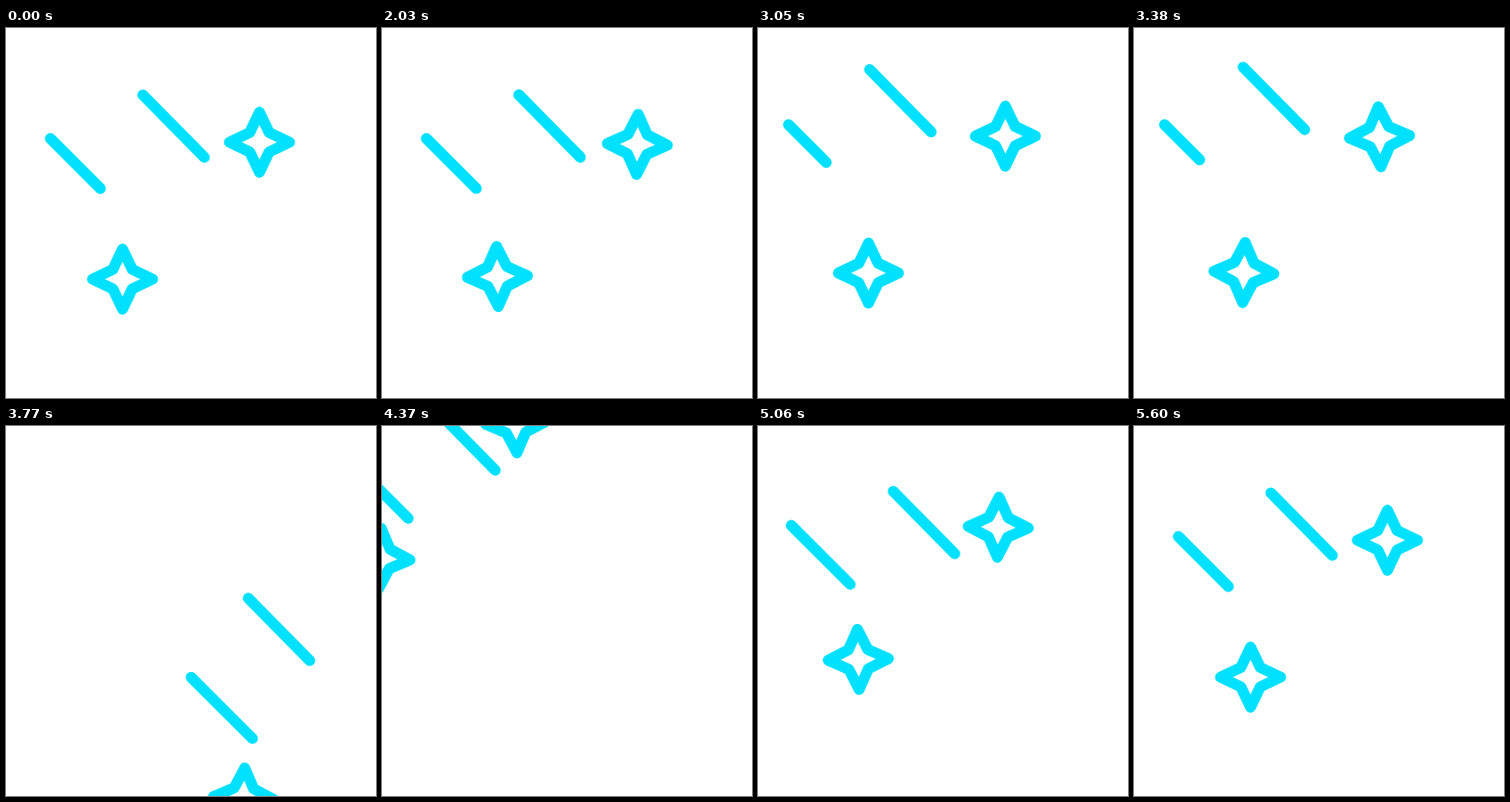
An HTML page for the animation above (5.63 s loop, 400 by 400 pixels).

```html
<!DOCTYPE html>
<html lang="en">
<head>
<meta charset="utf-8">
<title>Shooting stars</title>
<style>
  html, body { margin: 0; width: 100%; height: 100%; overflow: hidden; background: #fff; }
  svg { display: block; width: 100vw; height: 100vh; }
</style>
</head>
<body>
<svg viewBox="0 0 400 400" fill="none" stroke="#00e1ff" stroke-width="11.8" stroke-linecap="round" stroke-linejoin="round">
  <path id="long"/>
  <path id="short"/>
  <path id="upper" d="M0-32.5 10.5-10.5 32.5 0 10.5 10.5 0 32.5-10.5 10.5-32.5 0-10.5-10.5Z"/>
  <path id="lower" d="M0-32.5 10.5-10.5 32.5 0 10.5 10.5 0 32.5-10.5 10.5-32.5 0-10.5-10.5Z"/>
</svg>
<script>
const LOOP = 5630, HOLD = 2000, STEP = 30;
const RETURN = 2100, END = 3600;
const el = id => document.getElementById(id);
const clamp = v => Math.max(0, Math.min(1, v));
const ease = (t, from, to) => (1 - Math.cos(Math.PI * clamp((t - from) / (to - from)))) / 2;

// Diagonal shift: pull back, shoot off, then come in from the top left.
function travel(t, { back, from = 0, to = 1300, thrust, entry, power }) {
  if (t >= RETURN) return -entry * Math.pow((END - t) / 960, power);
  const launch = Math.max(0, t - 1537);
  return -back * ease(t, from, to) + thrust * launch * launch;
}

const motion = {
  long: { back: 30, thrust: .00265, entry: 28, power: 4.8 },
  tail: { back: 15, from: 380, to: 1000, thrust: .00308, entry: 38, power: 2 },
  head: { back: 31, thrust: .0036, entry: 26, power: 4.2 },
  upper: { back: 7.2, thrust: .0034, entry: 69, power: 2.5 },
  lower: { back: 7.2, thrust: .00254, entry: 69, power: 2.5 }
};

function line(id, x1, y1, x2, y2, a, b) {
  el(id).setAttribute('d', `M${x1 + a} ${y1 + a}L${x2 + b} ${y2 + b}`);
}

function star(id, x, y, d, angle) {
  el(id).setAttribute('transform', `translate(${x + d} ${y + d}) rotate(${angle})`);
}

function draw(time) {
  const t = Math.max(0, Math.floor((time % LOOP - HOLD) / STEP) * STEP);
  const shift = {};
  for (const key in motion) shift[key] = t ? travel(t, motion[key]) : 0;

  // The stars shake between two leaning poses.
  const wave = Math.sin(t / 300 * 2 * Math.PI);
  const plus = clamp(4 * wave), minus = clamp(-4 * wave);
  const angle = 1.6 * plus - 2.5 * minus;

  line('long', 148, 72.3, 214.5, 139.8, shift.long, shift.long);
  line('short', 48, 119.5, 102, 173.5, shift.tail, shift.head);
  star('upper', 274 + 2.1 * plus - 1.3 * minus, 123.5 + 2.3 * plus + 1.3 * minus, shift.upper, angle);
  star('lower', 126 - 1.2 * plus, 271.5 - 2.8 * plus, shift.lower, -angle);
}

const start = performance.now();
function tick() {
  draw(performance.now() - start);
  requestAnimationFrame(tick);
}
tick();
</script>
</body>
</html>
```
